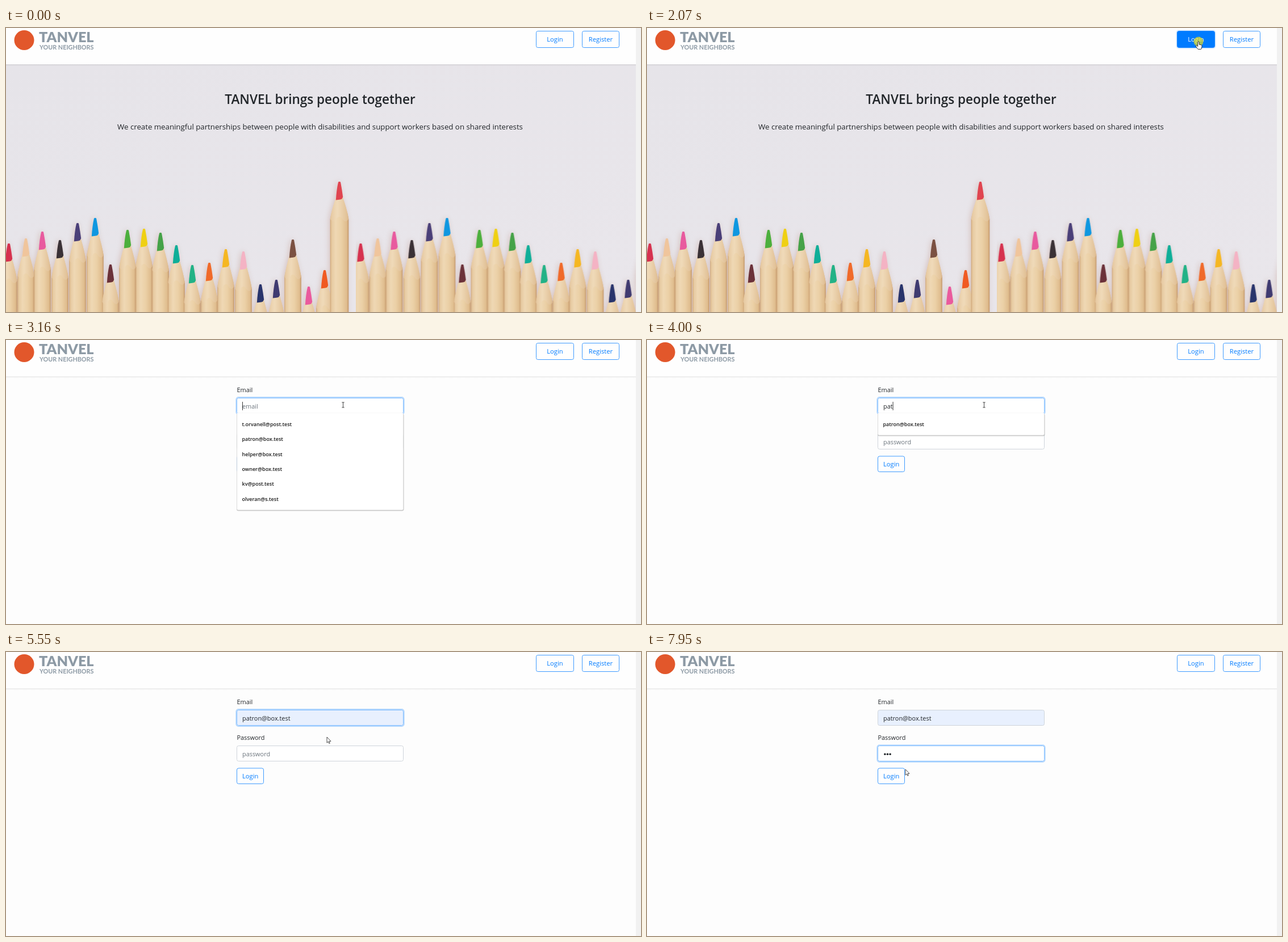
These frames come from a looping animation (1118x501 px, 8000 ms). An HTML page:

```html
<!DOCTYPE html>
<html lang="en">
<head>
<meta charset="utf-8">
<title>Login walkthrough</title>
<style>
  html, body { margin: 0; width: 100%; height: 100%; overflow: hidden; background: #fdfdfd; }
  svg { display: block; width: 1118px; height: 501px; }
  text { font-family: "Open Sans", "Noto Sans", sans-serif; font-size: 10.9px; fill: #212529; white-space: pre; }
  .btn rect { fill: #fefefe; stroke: #2a90ff; stroke-width: .9; rx: 3px; }
  .btn text { fill: #007bff; font-size: 11.2px; }
  .btn.on rect.face { fill: #007bff; stroke: #007bff; }
  .btn.on text { fill: #fff; }
  .field { fill: #fff; stroke: #ced4da; rx: 3px; }
  .field.focus { stroke: #80bdff; }
  .field.auto { fill: #e8f0fe; }
  .ring, .btn rect.ring { fill: none; stroke: #007bff; stroke-opacity: .28; stroke-width: 2.2; rx: 4px; }
  .hint { fill: #6c757d; }
  .row { font-size: 9px; font-weight: 600; fill: #1b1b1b; }
  .brand { font-family: Lato, sans-serif; fill: #8d9aa5; font-weight: 900; }
  .caret { stroke: #222; stroke-width: .9; }
</style>
</head>
<body>
<svg id="stage" viewBox="0 0 1118 501" xmlns="http://www.w3.org/2000/svg">
  <defs>
    <linearGradient id="wall" x1="0" y1="0" x2="1" y2="1">
      <stop offset="0" stop-color="#e6e4e9"/><stop offset="1" stop-color="#e9e6eb"/>
    </linearGradient>
    <linearGradient id="wood">
      <stop offset="0" stop-color="#cfa677"/><stop offset=".08" stop-color="#e6c9a0"/>
      <stop offset=".3" stop-color="#efd8b4"/><stop offset=".6" stop-color="#ebd0a6"/>
      <stop offset=".9" stop-color="#dfbc8d"/><stop offset="1" stop-color="#c2966a"/>
    </linearGradient>
    <linearGradient id="cone">
      <stop offset="0" stop-color="#e6c8a0"/><stop offset=".4" stop-color="#f0dbbb"/>
      <stop offset="1" stop-color="#e0bf95"/>
    </linearGradient>
    <linearGradient id="fade" x1="0" y1="0" x2="0" y2="1">
      <stop offset="0" stop-color="#000" stop-opacity=".08"/><stop offset="1" stop-color="#000" stop-opacity="0"/>
    </linearGradient>
    <clipPath id="left"><rect y="64" width="616" height="437"/></clipPath>
    <clipPath id="right"><rect x="616" y="64" width="493" height="437"/></clipPath>
  </defs>

  <rect width="1118" height="501" fill="#fdfdfd"/>

  <g id="hero">
    <rect y="64" width="1109" height="437" fill="url(#wall)"/>
    <g clip-path="url(#left)"><g id="tile" style="filter:drop-shadow(-2px 0 5px rgba(190,145,130,.4))"></g></g>
    <g clip-path="url(#right)"><use href="#tile" x="619.5"/></g>
    <text x="553" y="134" text-anchor="middle" style="font-size:22.5px;font-weight:600">TANVEL brings people together</text>
    <text x="553" y="179" text-anchor="middle" style="font-size:13.25px">We create meaningful partnerships between people with disabilities and support workers based on shared interests</text>
  </g>

  <g id="form">
    <text x="406.5" y="92">Email</text>
    <rect id="mailRing" class="ring" x="405.4" y="101" width="295.2" height="30"/>
    <rect id="mail" class="field" x="406.5" y="102.5" width="293" height="27"/>
    <text id="mailText" x="416" y="121"></text>
    <text x="406.5" y="155">Password</text>
    <rect id="passRing" class="ring" x="405.4" y="164.4" width="295.2" height="29.4"/>
    <rect id="pass" class="field" x="406.5" y="165.5" width="293" height="27"/>
    <text id="passHint" class="hint" x="416" y="184">password</text>
    <g id="dots" fill="#212529"></g>
    <g class="btn">
      <rect class="face" x="406.5" y="205" width="47" height="27.5"/>
      <text x="416" y="223">Login</text>
    </g>
    <g id="popup">
      <rect id="shade" x="406" y="130" width="294.5" rx="3" fill="#000" opacity=".22"/>
      <rect id="sheet" x="406.5" y="129" width="293" rx="2" fill="#fff" stroke="#d4d4d4" stroke-width=".6"/>
      <path d="M407 129.2H699" stroke="#fff" stroke-width="1.4"/>
      <rect id="pick" x="407" y="135.3" width="292.5" height="26.3" fill="#c8c8c8"/>
      <g id="rows"></g>
    </g>
    <path id="caret" class="caret"/>
  </g>

  <rect width="1109" height="64" fill="#fefefe"/>
  <rect y="64" width="1109" height="3.5" fill="url(#fade)"/>
  <circle cx="32" cy="21.5" r="17.5" fill="#e2572b"/>
  <text class="brand" x="58" y="25.3" style="font-size:25.2px">TANVEL</text>
  <text class="brand" x="59" y="38" style="font-size:10.8px;font-weight:700">YOUR NEIGHBORS</text>
  <g id="login" class="btn">
    <rect id="loginRing" class="ring" x="932.4" y="4.4" width="68.2" height="31.2"/>
    <rect class="face" x="933.5" y="5.5" width="66" height="29"/>
    <text x="966.5" y="24" text-anchor="middle">Login</text>
  </g>
  <g id="register" class="btn">
    <rect class="face" x="1014.5" y="5.5" width="65" height="29"/>
    <text x="1047" y="24" text-anchor="middle">Register</text>
  </g>
  <rect x="1109" width="9" height="501" fill="#f1f1f1"/>

  <g id="pointer">
    <circle id="glow" r="8.5" fill="#ffe600" opacity=".62"/>
    <path id="arrow" d="M0 0V10.2L2.3 8.1 3.8 11.4 5.3 10.8 3.9 7.6 7 7.4Z" fill="#fff" stroke="#222" stroke-width=".8"/>
    <path id="hand" d="M-1.3 1q0-1 1.2-1t1.2 1v4l3.8.9q1.3.4 1.2 1.8l-.7 4.3q-.3 1.5-1.5 1.5h-4q-1 0-1.7-1l-2.6-3.8q-.9-1.3.2-1.7t2 .6l.9.9z" fill="#fff" stroke="#222" stroke-width=".9"/>
    <path id="beam" d="M-2.2-4.5h4.4M0-4.5v9M-2.2 4.5h4.4" fill="none" stroke="#333" stroke-width=".9"/>
  </g>
</svg>
<script>
const LOOP = 8000;
const $ = id => document.getElementById(id);
const show = (id, on) => $(id).setAttribute('visibility', on ? 'inherit' : 'hidden');
const set = (id, attrs) => { for (const k in attrs) $(id).setAttribute(k, attrs[k]); };

// Pencil tips: x, y, lead colour, half width
const pencils = [
  [5, 380, '#d6324f'], [35, 371, '#f0c59c'], [64, 359, '#e85a9e'], [95, 374, '#3a3136'],
  [126, 344, '#4a3f78'], [157, 335, '#0f97e0'], [184, 417, '#6b3139'], [214, 356, '#4caf3c'],
  [243, 354, '#efd013'], [272, 361, '#45a248'], [300, 383, '#0fae98'], [328, 418, '#22b286'],
  [358, 414, '#f06a2a'], [387, 390, '#f5b722'], [418, 394, '#f4b3c4'], [448, 452, '#28346c'],
  [476, 444, '#3f3a70'], [505, 373, '#7b5142'], [533, 456, '#ea5a9d'], [561, 427, '#f05a22'],
  [587, 271, '#e04550', 16.3]
];

function pencil([x, y, color, w = 14.8]) {
  const s = y + 66, dip = w * 2 / 3;
  const right = `Q${x + w - 3} ${s - 18} ${x + 5.5} ${y + 27}Z`;
  const left = `M${x - 5.5} ${y + 27}Q${x - w + 3} ${s - 18} ${x - w} ${s}`;
  return `<path d="${left}V505H${x + w}V${s}${right}" fill="url(#wood)"/>
    <path d="${left}q${dip / 2} 8 ${dip} 0t${dip} 0t${dip} 0${right}" fill="url(#cone)" opacity=".8"/>
    <path d="M${x - 2} ${y + .8}q2 -1.8 4 0Q${x + 4.5} ${y + 14} ${x + 6.2} ${y + 27}q-1.5 4 -4.5 4.5t-7.9 1Q${x - 5} ${y + 14} ${x - 2} ${y + .8}Z" fill="${color}"/>`;
}
$('tile').innerHTML = pencils.map(pencil).join('');

const USER = 'patron@box.test';
const saved = ['t.orvanell@post.test', USER, 'helper@box.test', 'owner@box.test', 'kv@post.test', 'olveran@s.test'];
$('rows').innerHTML = saved.map((_, i) => `<text class="row" x="415.5" y="${151.8 + 26.4 * i}"></text>`).join('');
$('dots').innerHTML = [0, 1, 2].map(i => `<circle cx="${418.9 + 4.6 * i}" cy="180.3" r="1.75"/>`).join('');
const rows = [...$('rows').children], dots = [...$('dots').children];

// Screen updates: first, last, count
const bursts = [
  [490, 720, 4], [890, 1670, 11], [1820, 2150, 5], [2460, 3160, 10], [3470, 3470, 1], [3620, 3620, 1],
  [3770, 3770, 1], [4000, 4000, 1], [4170, 4170, 1], [4320, 4320, 1], [4860, 5320, 7], [5470, 5860, 6],
  [6320, 6320, 1], [6550, 6550, 1], [6780, 6780, 1], [6950, 6950, 1], [7480, 7950, 7]
];
function snap(t) {
  let out = 0;
  for (const [a, b, n] of bursts) {
    if (t < a) break;
    const step = (b - a) / Math.max(1, n - 1);
    out = t >= b ? b : a + step * Math.floor((t - a) / step + .1);
  }
  return out;
}

// Pointer track: time, x, y
const track = [
  [490, 994, 464], [570, 1008, 310], [645, 1022, 170], [720, 1031, 84], [890, 1052, 61], [1050, 1104, 42],
  [1200, 1078, 26], [1350, 1032, 20], [1500, 988, 22], [1670, 971, 24], [2380, 971, 24], [2560, 800, 62],
  [2690, 630, 106], [2771, 593.5, 114.5], [4800, 593.5, 114.5], [4860, 588, 121], [5013, 573.5, 141.5],
  [5320, 565, 150], [5550, 565, 150], [5780, 558, 172], [7420, 558, 172], [7720, 490, 196], [7950, 455, 207]
];
function pointerAt(t) {
  const i = track.findIndex(k => k[0] >= t);
  if (i < 0) return track[track.length - 1].slice(1);
  if (i === 0) return track[0].slice(1);
  const [t0, x0, y0] = track[i - 1], [t1, x1, y1] = track[i], p = (t - t0) / (t1 - t0);
  return [x0 + (x1 - x0) * p, y0 + (y1 - y0) * p];
}
const count = (t, times) => times.filter(k => t >= k).length;
const within = (t, a, b) => t >= a && t < b;

function draw(now) {
  const t = snap(now), [x, y] = pointerAt(t);
  const over = (l, r, top, bottom) => t >= 490 && x >= l && x <= r && y >= top && y <= bottom;
  const formPage = t >= 2150;
  show('hero', !formPage);
  show('form', formPage);

  const onLogin = over(933, 1000, 5, 35), onRegister = over(1014, 1080, 5, 35);
  $('login').classList.toggle('on', onLogin);
  $('register').classList.toggle('on', onRegister);
  set('loginRing', { opacity: t < 2060 ? 0 : t < 2150 ? .5 : t < 2840 ? 1 : 0 });

  // Email field and suggestions
  const mailFocus = within(t, 2840, 5775), passFocus = t >= 5775;
  const open = formPage && within(t, 2920, 5540);
  const hover = open && t >= 4860 && over(407, 700, 135, 162);
  const filled = t >= 5540;
  const typed = USER.slice(0, count(t, [3470, 3620, 4000, 4170, 4320]));
  $('mail').classList.toggle('focus', mailFocus);
  $('mail').classList.toggle('auto', hover || filled);
  show('mailRing', mailFocus && formPage);
  const mailText = $('mailText');
  mailText.textContent = hover || filled ? USER : typed || 'email';
  mailText.setAttribute('class', typed ? '' : 'hint');
  mailText.setAttribute('style', hover ? 'font:9.83px "Liberation Sans",Arial,sans-serif;fill:#000' : '');

  const short = t >= 3770, height = short ? 39 : 171;
  show('popup', open);
  set('sheet', { height });
  set('shade', { height: height + .6 });
  show('pick', hover);
  rows.forEach((row, i) => {
    row.textContent = t < 3470 ? saved[i] : i === 0 ? USER : t < 3620 ? saved[i] : '';
    row.setAttribute('opacity', i && t >= 3470 ? .4 : 1);
  });

  // Password field
  const n = count(t, [6550, 6780, 6950]);
  $('pass').classList.toggle('focus', passFocus);
  show('passRing', passFocus);
  show('passHint', formPage && !n);
  dots.forEach((d, i) => d.setAttribute('visibility', i < n ? 'inherit' : 'hidden'));

  const mailCaret = within(t, 2840, 4930);
  const passCaret = within(t, 5775, 6320) || within(t, 6550, 7480);
  show('caret', mailCaret || passCaret);
  const cx = mailCaret ? 416.5 + (typed ? mailText.getComputedTextLength() : 0) : 416.5 + 4.6 * n;
  set('caret', { d: `M${cx} ${mailCaret ? 109 : 171.5}v15` });

  // Pointer
  const hand = onLogin || onRegister || formPage && over(406, 454, 205, 233);
  const beam = formPage && (over(407, 700, 102, 129.5) || !open && over(407, 700, 165, 193));
  show('pointer', t >= 490);
  set('pointer', { transform: `translate(${x} ${y})` });
  show('hand', t >= 490 && hand);
  show('beam', t >= 490 && beam);
  show('arrow', t >= 490 && !hand && !beam);
  show('glow', within(t, 1980, 2150) || within(t, 2840, 3000) || within(t, 5470, 5540) || within(t, 5775, 5860));
}

const start = performance.now();
function tick() {
  draw((performance.now() - start) % LOOP);
  requestAnimationFrame(tick);
}
tick();
</script>
</body>
</html>
```
